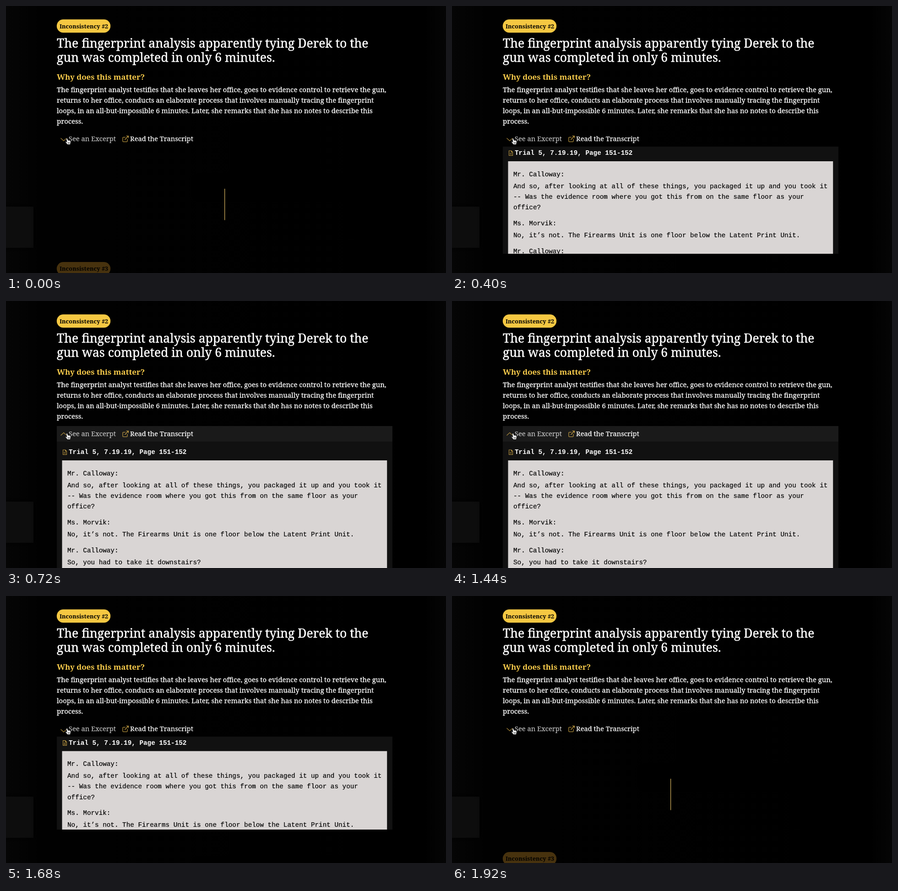
Recreate the animation shown at these times as an HTML page. Size 961 by 583 pixels, loop 2160 ms.

```html
<!DOCTYPE html>
<html lang="en">
<head>
<meta charset="utf-8">
<title>Inconsistency #2</title>
<style>
  /* --p: how far the excerpt is open, --row: tint of the link row,
     --cy / --flip: place and direction of the chevron */
  @property --p { syntax: '<number>'; inherits: true; initial-value: 0; }
  @property --row { syntax: '<number>'; inherits: true; initial-value: 0; }
  @property --cy { syntax: '<length>'; inherits: true; initial-value: 291.5px; }
  @property --flip { syntax: '<number>'; inherits: true; initial-value: 1; }

  html, body { margin: 0; width: 100%; height: 100%; overflow: hidden; background: #000; }
  #stage {
    position: relative; width: 961px; height: 583px; overflow: hidden;
    animation: toggle 2160ms step-end infinite;
  }
  svg { position: absolute; left: 0; top: 0; width: 961px; height: 583px; display: block; }

  text { white-space: pre; font-family: 'Noto Serif', serif; fill: #fff; }
  .title { font-size: 26.5px; stroke: #fff; stroke-width: .45px; }
  .why { font-size: 16.95px; font-weight: 700; fill: #f5c94a; }
  .body { font-size: 14.9px; stroke: #fff; stroke-width: .3px; }
  .link { font-size: 14.7px; stroke: #fff; stroke-width: .25px; }
  .hover { fill: #bcbcbc; stroke: #bcbcbc; }
  .badge { font-size: 12.75px; font-weight: 600; fill: #000; }
  .icon { fill: none; stroke: #d3aa48; stroke-width: 1.1; }

  #row { opacity: var(--row); }
  #chevron { transform: translate(126px, var(--cy)) scaleY(var(--flip)); }
  #below { transform: translateY(calc(var(--p) * 1045px)); }

  #panel {
    position: absolute; left: 111px; top: 307px; width: 733px;
    height: calc(var(--p) * 1045px); overflow: hidden; background: #111;
  }
  #panel svg { left: -111px; top: -307px; }
  #panel text {
    font: 14.3px 'Liberation Mono', monospace; fill: #000;
    stroke: #000; stroke-width: .2px;
  }
  #panel .page { font-weight: 700; fill: #fff; stroke: none; }
  #excerpt { transform: translateY(calc((var(--p) - 1) * 11.6px)); }

  @keyframes toggle {
    0%     { --p: 0;     --row: 0;   --cy: 291.5px; --flip: 1; }
    18.5%  { --p: .2243; --row: 0;   --cy: 291.5px; --flip: 1; }
    22.2%  { --p: .54;   --row: .4;  --cy: 292px;   --flip: -1; }
    25.9%  { --p: .85;   --row: .85; --cy: 291.5px; --flip: -1; }
    29.6%  { --p: .985;  --row: 1;   --cy: 290.5px; --flip: -1; }
    33.3%  { --p: 1;     --row: 1;   --cy: 290.5px; --flip: -1; }
    70.35% { --p: .79;   --row: .7;  --cy: 291.5px; --flip: -1; }
    74.05% { --p: .49;   --row: .3;  --cy: 293px;   --flip: -1; }
    77.75% { --p: .1946; --row: 0;   --cy: 294px;   --flip: 1; }
    81.45% { --p: .024;  --row: 0;   --cy: 292.3px; --flip: 1; }
    85.15%, 100% { --p: 0; --row: 0; --cy: 291.5px; --flip: 1; }
  }
</style>
</head>
<body>
<div id="stage">
  <svg viewBox="0 0 961 583">
    <defs>
      <linearGradient id="edges">
        <stop offset="0" stop-color="#050505"/>
        <stop offset=".08" stop-color="#010101"/>
        <stop offset=".95" stop-color="#000"/>
        <stop offset="1" stop-color="#050505"/>
      </linearGradient>
      <filter id="soft"><feGaussianBlur stdDeviation="7"/></filter>
    </defs>
    <rect width="961" height="583" fill="url(#edges)"/>
    <rect x="-20" y="438" width="80" height="90" fill="#070707" filter="url(#soft)"/>

    <rect x="110.8" y="29.3" width="117.4" height="28.9" rx="14.4" fill="#f5c842"/>
    <text class="badge" x="117" y="48.5">Inconsistency #2</text>

    <text class="title" x="111" y="91">The fingerprint analysis apparently tying Derek to the</text>
    <text class="title" x="111" y="122.3">gun was completed in only 6 minutes.</text>
    <text class="why" x="111" y="160.5">Why does this matter?</text>
    <g class="body">
      <text x="111" y="187.8">The fingerprint analyst testifies that she leaves her office, goes to evidence control to retrieve the gun,</text>
      <text x="111" y="211">returns to her office, conducts an elaborate process that involves manually tracing the fingerprint</text>
      <text x="111" y="234.2">loops, in an all-but-impossible 6 minutes. Later, she remarks that she has no notes to describe this</text>
      <text x="111" y="257.4">process.</text>
    </g>

    <g id="below">
      <g filter="url(#soft)" fill="#050505">
        <rect x="405" y="365" width="395" height="62"/>
        <rect x="490" y="255" width="195" height="110"/>
      </g>
      <rect x="477" y="399" width="1.3" height="68.5" fill="#cdab5a"/>
      <rect x="110.8" y="559" width="117.4" height="28.9" rx="14.4" fill="#47320e"/>
      <text class="badge" x="117" y="578">Inconsistency #3</text>
    </g>

    <rect id="row" x="111" y="273" width="733" height="34" fill="#1a1a1a"/>
    <path id="chevron" class="icon" stroke-opacity=".8" d="M-6.5-3 0 3 6.5-3"/>
    <text class="link hover" x="137" y="295">See an Excerpt</text>
    <path class="icon" d="M261 286.5h-4.5q-1.5 0-1.5 1.5v7q0 1.5 1.5 1.5h7q1.5 0 1.5-1.5v-4.5M259.5 292 267 284M262.5 283.8h4.8v4.8"/>
    <text class="link" x="271" y="295">Read the Transcript</text>

    <g transform="translate(129 288)" stroke="#000" stroke-width=".8" stroke-linejoin="round">
      <path fill="#fff" d="M3.5 1.2C4.3.7 5 1 5.3 1.8L6.6 5.6C7.3 5 8.3 5.2 8.7 5.9 9.4 5.4 10.3 5.6 10.6 6.4 11.4 6 12 6.5 12.1 7.3L12.2 10.5 11.2 14.5H5.2L1.2 9.4C.5 8.4 1.6 7.5 2.6 8.2L4.1 9.5 2.7 2.9C2.5 2 2.9 1.5 3.5 1.2Z"/>
      <path fill="none" d="M6.5 9.5v3M8.2 9.5v3M9.9 9.5v3"/>
    </g>
  </svg>

  <div id="panel">
    <svg viewBox="0 0 961 583">
      <g id="excerpt">
        <path class="icon" stroke-opacity=".85" d="M124.5 325h5l3 3v7.5h-8zM129.5 325v3h3M126.3 330.5h4.4M126.3 333h4.4"/>
        <text class="page" x="137" y="334">Trial 5, 7.19.19, Page 151-152</text>
        <rect x="122.5" y="348" width="709.7" height="900" fill="#d9d5d4"/>
        <text x="134" y="380.5">Mr. Calloway:</text>
        <text x="134" y="406.5">And so, after looking at all of these things, you packaged it up and you took it</text>
        <text x="134" y="429.7">-- Was the evidence room where you got this from on the same floor as your</text>
        <text x="134" y="452.9">office?</text>
        <text x="134" y="487.8">Ms. Morvik:</text>
        <text x="134" y="513.8">No, it’s not. The Firearms Unit is one floor below the Latent Print Unit.</text>
        <text x="134" y="548.7">Mr. Calloway:</text>
        <text x="134" y="574.5">So, you had to take it downstairs?</text>
      </g>
    </svg>
  </div>
</div>
</body>
</html>
```
